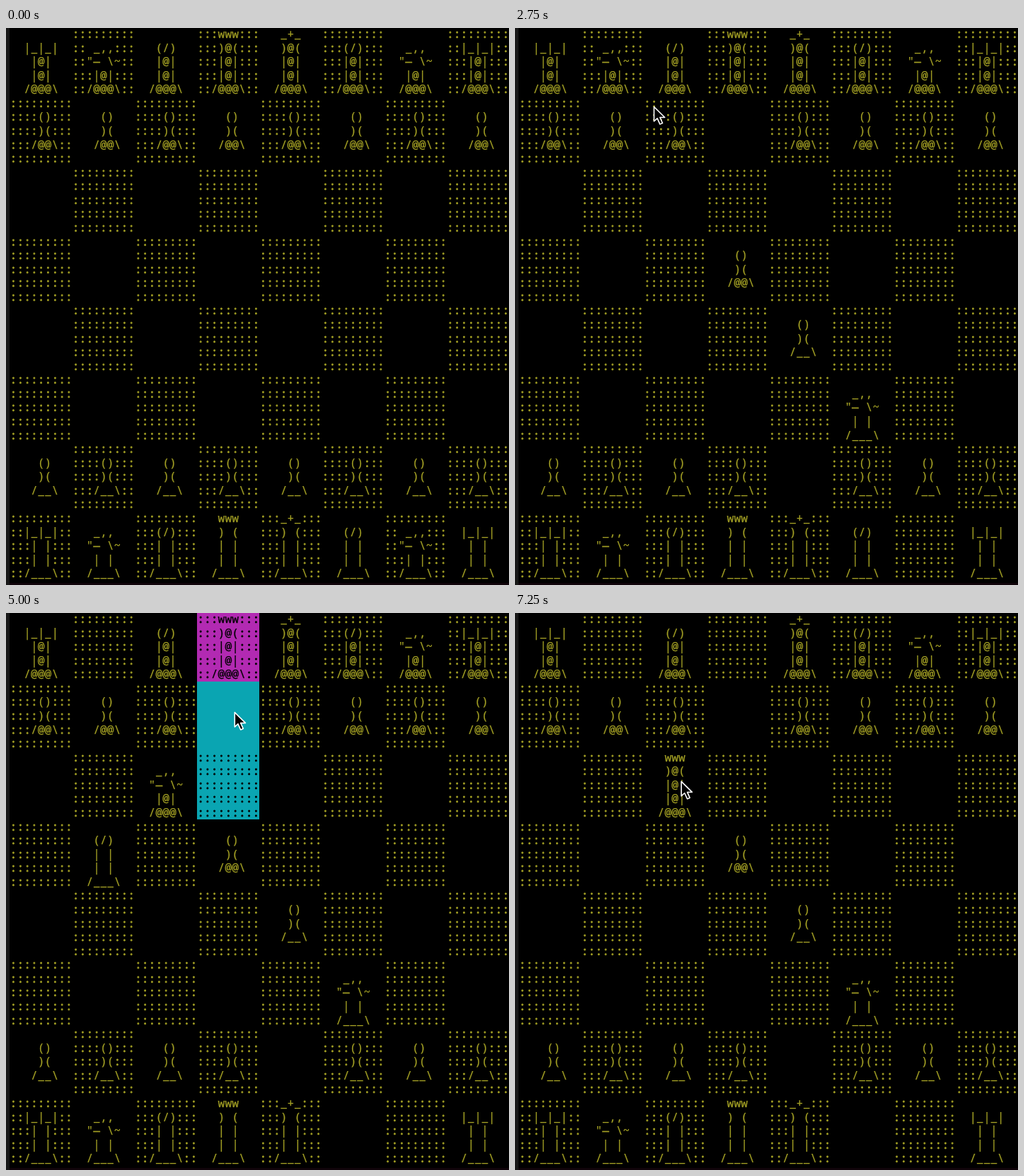
Recreate the animation shown at these times as an HTML page with a canvas. Size 711 by 788 pixels, loop 7500 ms.

```html
<!DOCTYPE html>
<html lang="en">
<head>
<meta charset="utf-8">
<title>Terminal chess</title>
<style>
  html, body { margin: 0; width: 100%; height: 100%; overflow: hidden; background: #000; }
  canvas { display: block; }
</style>
</head>
<body>
<canvas id="stage" width="711" height="788"></canvas>
<script>
const ctx = document.getElementById('stage').getContext('2d');
const LOOP = 7500, STEP = 250;
const LEFT = 5.6, TOP = -1.2, CHAR = 9.8, LINE = 19.57, BASELINE = 15.2;
const CELL_W = CHAR * 9, CELL_H = LINE * 5;
const YELLOW = '#a09d24', MAGENTA = '#b22ab2', CYAN = '#0aa5b2';
const FONT = '"Noto Sans Mono", "DejaVu Sans Mono", monospace';

// A dot lets the square show through, a space hides it.
const EMPTY = '.........';
const body = '...|@|...', base = '../@@@\\..';
const ART = {
  p: [EMPTY, '....()...', '....)(...', '.../@@\\..', EMPTY],
  r: [EMPTY, '..|_|_|..', body, body, base],
  n: [EMPTY, '.. _,,...', '.."— \\~..', body, base],
  b: [EMPTY, '...(/)...', body, body, base],
  q: ['...www...', '...)@(...', body, body, base],
  k: ['..._+_...', '...)@(...', body, body, base]
};
const BLANK = Array(5).fill(EMPTY);
const SETUP = ['rnbqkbnr', 'pppppppp', '', '', '', '', 'PPPPPPPP', 'RNBQKBNR'];

// Each move lands at its step; the piece is picked up shortly before.
const PICK_LEAD = 2.4, AIM_LEAD = 1;
const cell = name => [8 - name[1], name.charCodeAt(0) - 97];
const MOVES = [
  [4, 'e2', 'e4'], [7, 'd7', 'd5'], [10, 'g1', 'f3'], [14, 'b8', 'c6'],
  [18, 'f1', 'b5'], [21, 'd8', 'd7'], [24, 'b5', 'c6'], [27, 'd7', 'c6']
].map(([at, from, to]) => ({ at, from: cell(from), to: cell(to) }));

const isWhite = piece => piece < 'a';

function boardAt(step) {
  const board = SETUP.map(row => row.padEnd(8).split(''));
  for (const { at, from: [r, c], to: [r2, c2] } of MOVES) {
    if (step < at) break;
    board[r2][c2] = board[r][c];
    board[r][c] = ' ';
  }
  return board;
}

// Step directions by the absolute row and column change.
const DIRECTION = {
  n: (a, b) => a * b === 2,
  b: (a, b) => a * b === 1,
  r: (a, b) => a + b === 1,
  q: (a, b) => Math.max(a, b) === 1,
  k: (a, b) => Math.max(a, b) === 1
};

function targets(board, [r, c]) {
  const piece = board[r][c], kind = piece.toLowerCase(), found = [];
  const at = (y, x) => board[y] && board[y][x];
  const enemy = p => p && p !== ' ' && isWhite(p) !== isWhite(piece);
  if (kind === 'p') {
    const dir = isWhite(piece) ? -1 : 1, reach = r === 1 || r === 6 ? 2 : 1;
    for (let i = 1; i <= reach && at(r + dir * i, c) === ' '; i++) found.push([r + dir * i, c]);
    for (const x of [c - 1, c + 1]) if (enemy(at(r + dir, x))) found.push([r + dir, x]);
    return found;
  }
  const reach = 'nk'.includes(kind) ? 1 : 7;
  for (let dr = -2; dr <= 2; dr++) {
    for (let dc = -2; dc <= 2; dc++) {
      if (!DIRECTION[kind](Math.abs(dr), Math.abs(dc))) continue;
      for (let i = 1; i <= reach; i++) {
        const y = r + dr * i, x = c + dc * i, hit = at(y, x);
        if (hit === ' ' || enemy(hit)) found.push([y, x]);
        if (hit !== ' ') break;
      }
    }
  }
  return found;
}

function glyph(ch, x, y) {
  // Underscores leave a small gap between neighbours; colons have heavy dots.
  ctx.font = (ch === '_' ? 14 : 16.33) + 'px ' + FONT;
  ctx.lineWidth = ch === ':' ? 0.9 : 0.25;
  ctx.fillText(ch, x, y);
  ctx.strokeText(ch, x, y);
}

function drawCell(r, c, piece, fill) {
  const x = LEFT + c * CELL_W, y = TOP + r * CELL_H;
  if (fill) {
    const x0 = Math.round(x), y0 = Math.round(y);
    ctx.fillStyle = fill;
    ctx.fillRect(x0, y0, Math.round(x + CELL_W) - x0, Math.round(y + CELL_H) - y0);
  }
  ctx.fillStyle = ctx.strokeStyle = fill ? '#000' : YELLOW;
  const ground = (r + c) % 2 ? ':' : ' ';
  (ART[piece.toLowerCase()] || BLANK).forEach((line, j) => {
    const hollow = line.includes('/@') ? '_' : ' ';
    [...line].forEach((ch, i) => {
      if (ch === '.') ch = ground;
      if (ch === '@' && isWhite(piece)) ch = hollow;
      if (ch !== ' ') glyph(ch, x + (i + 0.5) * CHAR, y + j * LINE + BASELINE);
    });
  });
}

// The pointer rests a little above and right of a square's centre.
const spot = ([r, c]) => [LEFT + (c + 0.5) * CELL_W + 8, TOP + (r + 0.5) * CELL_H - 6];

function pointerAt(step) {
  let [x, y] = spot([5, 4]), left = 0;
  const glide = (until, square) => {
    const t = Math.min(1, Math.max(0, (step - left) / (until - left)));
    const ease = 1 - (1 - t) ** 2, [tx, ty] = spot(square);
    x += (tx - x) * ease;
    y += (ty - y) * ease;
  };
  for (const { at, from, to } of MOVES) {
    glide(at - PICK_LEAD, from);
    left = at - PICK_LEAD;
    glide(at - AIM_LEAD, to);
    left = at;
  }
  return [x, y];
}

const ARROW = new Path2D('M1 1V21.5L5.6 17.3L9.4 25.6L13 24L9.4 16H16.2Z');

function drawPointer(step) {
  ctx.save();
  ctx.translate(...pointerAt(step));
  ctx.fillStyle = '#000';
  ctx.strokeStyle = '#fff';
  ctx.lineWidth = 1.6;
  ctx.fill(ARROW);
  ctx.stroke(ARROW);
  ctx.restore();
}

function draw(step) {
  ctx.fillStyle = '#000';
  ctx.fillRect(0, 0, 711, 788);
  ctx.fillStyle = '#171717';
  ctx.fillRect(0, 0, 5, 788);
  ctx.fillStyle = '#10040a';
  ctx.fillRect(5, 785, 706, 3);
  ctx.textAlign = 'center';
  ctx.lineJoin = 'round';

  const board = boardAt(step), fills = {};
  const pick = MOVES.find(({ at }) => step >= at - PICK_LEAD && step < at);
  if (pick) {
    for (const square of targets(board, pick.from)) fills[square] = CYAN;
    fills[pick.from] = MAGENTA;
  }
  board.forEach((row, r) =>
    row.forEach((piece, c) => drawCell(r, c, piece, fills[[r, c]])));
  if (step > 0) drawPointer(step);
}

let shown = -1;
const start = performance.now();
function tick() {
  const step = Math.floor((performance.now() - start) % LOOP / STEP);
  if (step !== shown) draw(shown = step);
  requestAnimationFrame(tick);
}
tick();
</script>
</body>
</html>
```
